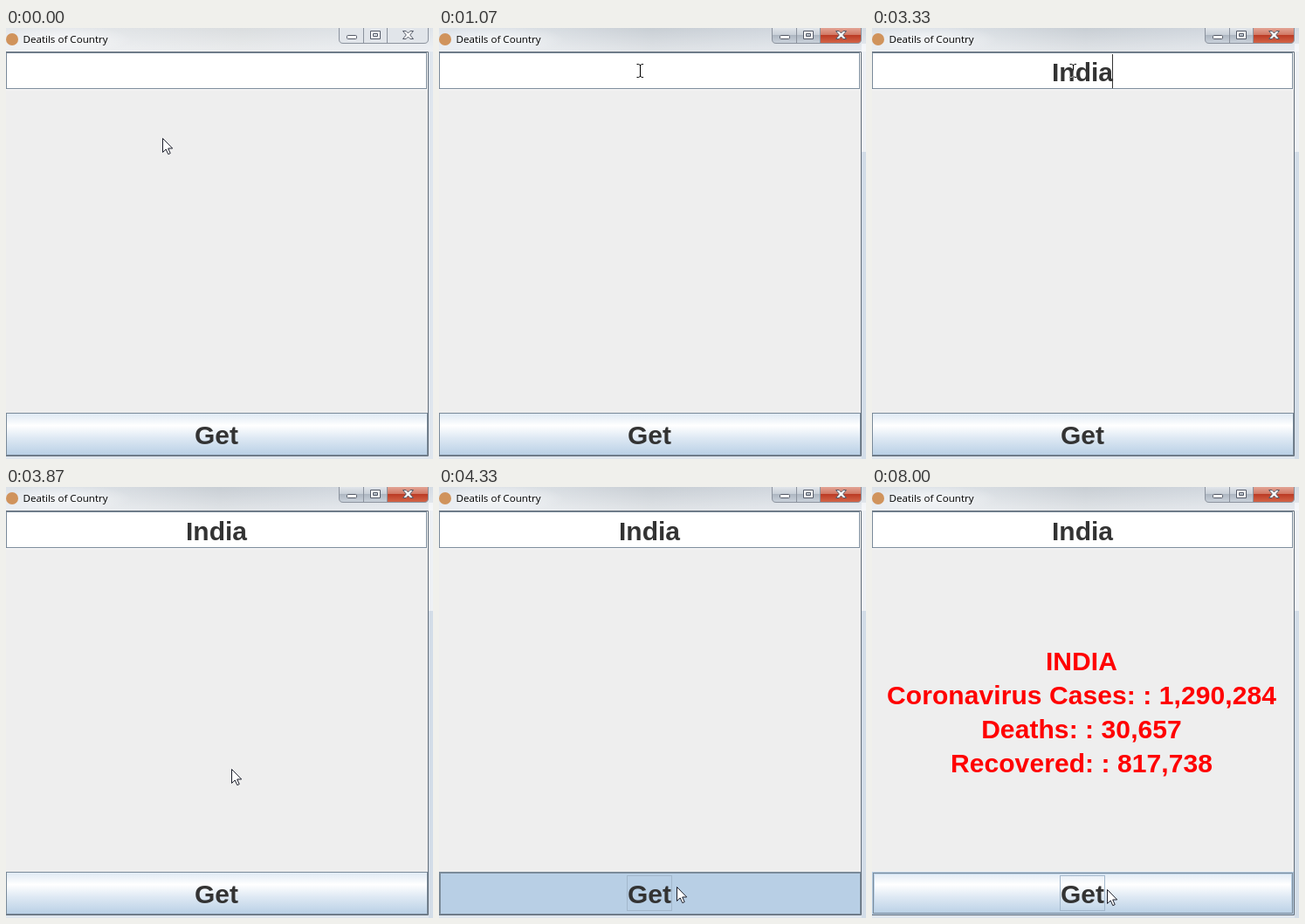
Animation, 489 px wide and 494 px high, one loop 9670 ms. Source, as an HTML page:

```html
<!DOCTYPE html>
<html lang="en">
<head>
<meta charset="utf-8">
<title>Country details</title>
<style>
html, body { margin: 0; width: 100%; height: 100%; overflow: hidden; background: #eee; }
svg { display: block; width: 489px; height: 494px; isolation: isolate; }
text { fill: #333; font: bold 30px "Liberation Sans", Arial, sans-serif; white-space: pre; }
.title { fill: #000; font: 11.6px "Open Sans", "Noto Sans", sans-serif; }
#result text { fill: #f00; text-anchor: middle; letter-spacing: .08px; }
.line { fill: none; stroke: #7a8a99; }
.soft { fill: none; stroke: #b8cfe5; }
.glyph { fill: #fff; stroke: #535966; }
#ibeam { fill: none; stroke: #fff; mix-blend-mode: difference; }
</style>
</head>
<body>
<svg viewBox="0 0 489 494" shape-rendering="auto">
  <defs>
    <linearGradient id="bar">
      <stop offset="0" stop-color="#e3e7eb"/><stop offset=".25" stop-color="#e1e4e7"/>
      <stop offset=".55" stop-color="#dadddf"/><stop offset="1" stop-color="#dfe4ea"/>
    </linearGradient>
    <linearGradient id="barActive">
      <stop offset="0" stop-color="#dce2e9"/><stop offset=".25" stop-color="#d8dde2"/>
      <stop offset=".5" stop-color="#c8ced4"/><stop offset=".75" stop-color="#cfd5dc"/>
      <stop offset="1" stop-color="#d5dce4"/>
    </linearGradient>
    <linearGradient id="shine" x2="0" y2="1">
      <stop offset="0" stop-color="#fff" stop-opacity="0"/><stop offset="1" stop-color="#fff" stop-opacity=".45"/>
    </linearGradient>
    <radialGradient id="glow">
      <stop offset="0" stop-color="#fff" stop-opacity=".65"/><stop offset="1" stop-color="#fff" stop-opacity="0"/>
    </radialGradient>
    <linearGradient id="steel" x2="0" y2="1">
      <stop offset="0" stop-color="#e3e7ec"/><stop offset=".48" stop-color="#c9d0d8"/>
      <stop offset=".5" stop-color="#adb6c1"/><stop offset="1" stop-color="#cbd3dc"/>
    </linearGradient>
    <linearGradient id="red" x2="0" y2="1">
      <stop offset="0" stop-color="#e5aa9c"/><stop offset=".46" stop-color="#d27a66"/>
      <stop offset=".5" stop-color="#bb3a24"/><stop offset="1" stop-color="#d4674a"/>
    </linearGradient>
    <linearGradient id="ocean" x2="0" y2="1">
      <stop offset="0" stop-color="#dde8f3"/><stop offset=".3" stop-color="#fff"/>
      <stop offset=".6" stop-color="#dde8f3"/><stop offset="1" stop-color="#b8cfe5"/>
    </linearGradient>
  </defs>

  <!-- window frame -->
  <rect width="489" height="494" fill="#dfe6ee"/>
  <rect width="489" height="27" fill="url(#bar)"/>
  <g id="activeFrame">
    <rect width="489" height="27" fill="url(#barActive)"/>
    <rect x="484" y="18" width="5" height="124" fill="#eef1f5"/>
    <rect x="484" y="142" width="5" height="352" fill="#d3dde8"/>
  </g>
  <rect width="489" height="27" fill="url(#shine)"/>
  <ellipse cx="66" cy="13" rx="78" ry="16" fill="url(#glow)"/>
  <circle cx="7" cy="13" r="7" fill="#d0935c"/>
  <text class="title" x="19.5" y="17">Deatils of Country</text>

  <!-- caption buttons -->
  <path d="M381.5 -1V13Q381.5 17.500 386 17.500H479Q483.500 17.500 483.500 13V-1Z" fill="#e1e5ea"/>
  <g id="activeButtons">
    <path d="M381.5 -1V13Q381.500 17.500 386 17.500H437V-1Z" fill="url(#steel)"/>
    <path d="M437 -1V17.500H479Q483.500 17.500 483.500 13V-1Z" fill="url(#red)"/>
  </g>
  <path d="M381.5 -1V13Q381.500 17.500 386 17.500H479Q483.500 17.500 483.500 13V-1M409.500 0V17M436.500 0V17" fill="none" stroke="#8b929d"/>
  <rect class="glyph" x="390.500" y="8.500" width="11" height="4" rx="1"/>
  <path class="glyph" fill-rule="evenodd" d="M417.500 3.500H428.500V12.500H417.500ZM420.500 6.500H425.500V9.500H420.500Z"/>
  <path class="glyph" d="M454.500 3.500H458.200L460.500 6L462.800 3.500H466.500L462.700 8L466.500 12.500H462.800L460.500 10L458.200 12.500H454.500L458.300 8Z"/>

  <!-- client area -->
  <rect y="27" width="484" height="464" fill="#eee"/>
  <path d="M0 27.500H483.500V490.500H0" fill="none" stroke="#626d79"/>
  <rect y="28" width="483" height="42" fill="#fff"/>
  <rect class="line" x=".5" y="28.500" width="481" height="41"/>
  <path d="M0 70.500H483" stroke="#fff"/>
  <text id="entry" y="61"></text>
  <rect id="caret" y="30" width="1" height="39" fill="#333"/>
  <g id="result">
    <text x="240" y="210">INDIA</text>
    <text x="240" y="249">Coronavirus Cases: : 1,290,284</text>
    <text x="240" y="288">Deaths: : 30,657</text>
    <text x="240" y="327">Recovered: : 817,738</text>
  </g>

  <!-- Get button -->
  <rect id="face" y="441" width="483" height="49"/>
  <rect class="line" id="edge" x=".5" y="441.500" width="482" height="48"/>
  <g id="rollover">
    <rect class="soft" x=".5" y="441.500" width="482" height="48"/>
    <rect class="soft" x="2.500" y="443.500" width="478" height="44"/>
    <rect class="line" x="1.500" y="442.500" width="480" height="46"/>
  </g>
  <path id="sunken" d="M0 442.500H482M1.500 442V489" class="line"/>
  <rect id="focus" x="215.500" y="445.500" width="51" height="40" fill="none" stroke="#a3b8cc"/>
  <text x="216" y="477">Get</text>

  <!-- pointers -->
  <path id="ibeam" d="M-3.500 -7.500H-1.500L.5 -6.500L2.500 -7.500H4M.5 -7V7M-3.500 7.500H-1.500L.5 6.500L2.500 7.500H4"/>
  <path id="arrow" d="M.5 .5V16.500L4.200 13L6.800 18.700L9.200 17.600L6.700 12H11.700Z" fill="#fff" stroke="#1c1f2b"/>
</svg>
<script>
const LOOP = 9670;
const WORD = "India";
const KEY_TIMES = [1400, 1670, 1870, 2000, 2270];
const WIDTHS = [0, 8, 26, 44, 52, 69];
const CARET_ON = [[600, 1070], [1400, 2800], [3330, 3870]];
const PRESS = 4330, DONE = 8000;

const el = id => document.getElementById(id);
const show = (id, on) => { el(id).style.display = on ? "" : "none"; };
const clamp = v => Math.min(1, Math.max(0, v));
const smooth = v => v * v * (3 - 2 * v);
const mix = (a, b, p) => a.map((v, i) => Math.round(v + (b[i] - v) * p));

// The pointer is sampled 15 times a second.
function pointer(tick) {
  if (tick < 50) return mix([179, 126], [230, 49], smooth(clamp(tick / 5)));
  if (tick < 67) return mix([230, 49], [272, 458], smooth(clamp((tick - 50) / 13)));
  return tick < 68 ? [270, 460] : [269, 461];
}

function draw(t) {
  const tick = Math.floor((t + 4) * 15 / 1000);
  const [x, y] = pointer(tick);
  const inField = y < 70;
  const pressed = t >= PRESS && t < DONE;
  const hover = y >= 441 && !pressed;

  const active = tick < 8 ? 0 : tick < 9 ? 0.5 : 1;
  el("activeFrame").setAttribute("opacity", active);
  el("activeButtons").setAttribute("opacity", active);

  const typed = KEY_TIMES.filter(k => t >= k).length;
  const width = WIDTHS[typed];
  el("entry").textContent = WORD.slice(0, typed);
  el("entry").setAttribute("x", Math.floor(240.5 - width / 2));
  el("caret").setAttribute("x", Math.floor(240.5 + width / 2));
  show("caret", CARET_ON.some(([from, to]) => t >= from && t < to));

  el("face").setAttribute("fill", pressed ? "#b8cfe5" : "url(#ocean)");
  show("rollover", hover);
  show("edge", !hover);
  show("sunken", pressed);
  show("focus", t >= PRESS);
  show("result", t >= DONE);

  show("ibeam", inField);
  show("arrow", !inField);
  el(inField ? "ibeam" : "arrow").setAttribute("transform", `translate(${x} ${y})`);
}

const start = performance.now();
function frame() {
  draw((performance.now() - start) % LOOP);
  requestAnimationFrame(frame);
}
frame();
</script>
</body>
</html>
```
